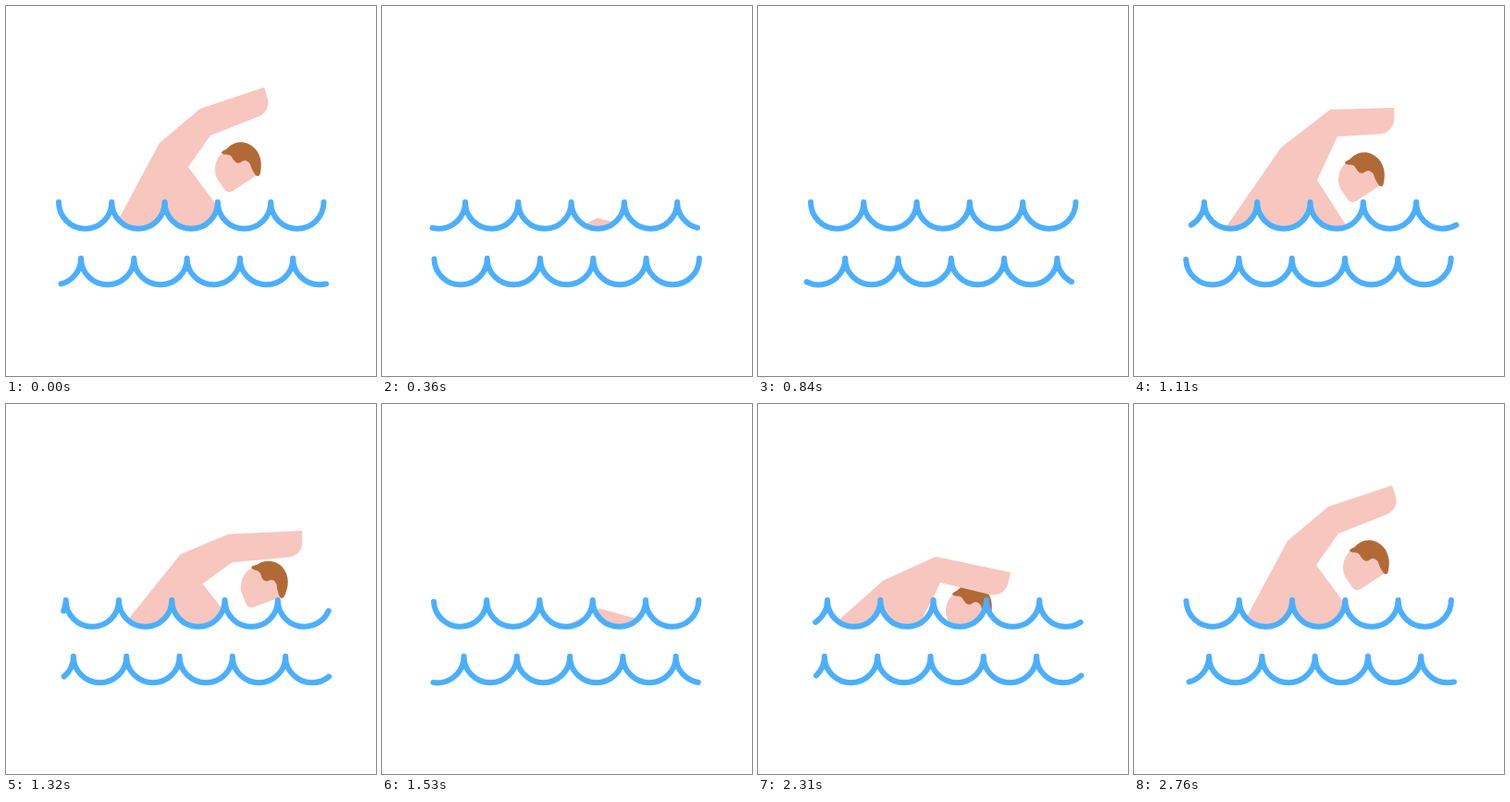
These frames come from a looping animation (400x400 px, 2.79 s). An HTML page with a canvas:

```html
<!DOCTYPE html>
<html lang="en">
<head>
<meta charset="utf-8">
<title>Swimmer</title>
<style>
html, body { margin: 0; height: 100%; overflow: hidden; background: #fff; }
canvas { display: block; width: 400px; height: 400px; }
</style>
</head>
<body>
<canvas id="stage" width="400" height="400"></canvas>
<script>
const ctx = document.getElementById('stage').getContext('2d');
const LOOP = 2790, STEP = 30;
const SKIN = '#f7c6be', HAIR = '#b16a35', WATER = '#4bafff';
const RADIUS = 28.65, LEFT = 57;

// Smooth interpolation that never overshoots its keys
function track(times, values, t) {
  const last = times.length - 1;
  let i = 0;
  while (i < last - 1 && t >= times[i + 1]) i++;
  const slope = k => (values[k + 1] - values[k]) / (times[k + 1] - times[k]);
  const tangent = k => {
    if (k === 0) return slope(0);
    if (k === last) return slope(last - 1);
    const a = slope(k - 1), b = slope(k);
    return a * b > 0 ? 2 * a * b / (a + b) : 0;
  };
  const h = times[i + 1] - times[i], u = Math.min(1, (t - times[i]) / h), v = 1 - u;
  return values[i] * (1 + 2 * u) * v * v + tangent(i) * h * u * v * v +
    values[i + 1] * u * u * (3 - 2 * u) - tangent(i + 1) * h * u * u * v;
}

// Points: hip, shoulder, elbow, fingertip, inner elbow, armpit, belly, head offset; then head turn
const REACH = [107, 258, 166, 148, 210, 111, 279, 88, 221, 140, 197, 174, 250, 246, 0, 0, 0];
const RISE = [87, 257, 159, 153, 212, 112, 281, 110, 220, 141, 198, 188, 240, 254, -5, 11, 0];
const EMERGE = [69, 250, 135, 191, 192, 165, 273, 182, 197, 193, 190, 208, 168, 250, -23, 47, 0];
const SWING = [120, 252, 200, 172, 256, 160, 338, 166, 256, 191, 222, 207, 262, 262, 38, 36, 20];
const DIVE = [163, 258, 235, 221, 290, 236, 366, 258, 282, 266, 255, 255, 262, 290, 50, 110, 40];
const moved = (pose, dx, dy) => pose.map((v, i) => i === 16 ? v : v + (i % 2 ? dy : dx));
const SINK = moved(DIVE, -2, 8);
const GONE = moved(DIVE, 0, 45);
const RETURN = moved(EMERGE, -10, 85);

const KEYS = [
  [-30, REACH], [0, REACH], [170, SWING], [330, DIVE], [360, SINK], [450, GONE],
  [850, RETURN], [990, EMERGE], [1110, RISE], [1200, REACH], [1370, SWING],
  [1530, DIVE], [1570, SINK], [1680, GONE], [2165, RETURN], [2310, EMERGE],
  [2470, RISE], [2760, REACH], [2790, REACH]
];
const KEY_TIMES = KEYS.map(k => k[0]);
const poseAt = t => REACH.map((_, i) => track(KEY_TIMES, KEYS.map(k => k[1][i]), t));

// Crest offsets in wavelengths: the upper row drifts left, the lower one right
const WAVE_TIMES = [0, 360, 840, 1110, 1530, 2310, 2760];
const UPPER = [3, 2.576, 2, 1.33, 0.98, 0.314, -0.01];
const LOWER = [0.42, 0.99, 1.65, 1.985, 2.55, 3.26, 3.42];

// Five half circles, cut by arc length while the crests slide
function wavePath(y, offset) {
  const phase = offset - Math.floor(offset);
  const cut = Math.PI * phase;
  const x = LEFT + 2 * RADIUS * (phase - 1);
  ctx.beginPath();
  for (let k = 0; k < 6; k++) {
    ctx.arc(x + RADIUS * (2 * k + 1), y, RADIUS,
      k === 0 ? cut : Math.PI, k === 5 ? cut : 0, true);
  }
}

function drawWave(y, offset) {
  wavePath(y, offset);
  ctx.stroke();
}

function drawHead(dx, dy, turn) {
  ctx.save();
  ctx.translate(250 + dx, 175 + dy);
  ctx.rotate(turn * Math.PI / 180);
  ctx.translate(-250, -175);
  ctx.fillStyle = SKIN;
  ctx.fill(new Path2D('M234 159C225 166 224 180 229 188L236 198Q239 203 245 200L271 183L262 164Z'));
  ctx.fillStyle = HAIR;
  ctx.fill(new Path2D('M233 159C234 155 237 157 240 153C246 147 255 146 262 149' +
    'C273 154 278 166 275 180Q274 186 270 183C267 179 265 175 264 171' +
    'C260 165 256 167 254 169C249 171 247 168 244 163C241 159 236 162 233 159Z'));
  ctx.restore();
}

function drawBody(p) {
  const [hx, hy, sx, sy, ex, ey, tx, ty, ix, iy, ax, ay, bx, by] = p;
  const angle = Math.atan2(ty - ey, tx - ex), c = Math.cos(angle), s = Math.sin(angle);
  const hand = (along, across) => [tx + along * c - across * s, ty + along * s + across * c];
  ctx.fillStyle = SKIN;
  ctx.beginPath();
  ctx.moveTo(hx, hy);
  ctx.lineTo(sx, sy);
  ctx.lineTo(ex, ey);
  ctx.lineTo(tx, ty);
  ctx.lineTo(...hand(0, 11));
  ctx.bezierCurveTo(...hand(0, 21), ...hand(-7, 28), ...hand(-17, 28));
  ctx.lineTo(ix, iy);
  ctx.lineTo(ax, ay);
  ctx.lineTo(bx, by);
  ctx.fill();
}

function draw(t) {
  const pose = poseAt(t);
  const upper = track(WAVE_TIMES, UPPER, t);
  ctx.clearRect(0, 0, 400, 400);

  // Only what is above the upper row shows
  ctx.save();
  wavePath(212, upper);
  ctx.lineTo(400, 240);
  ctx.lineTo(400, 0);
  ctx.lineTo(0, 0);
  ctx.lineTo(0, 240);
  ctx.clip();
  drawHead(...pose.slice(14));
  drawBody(pose);
  ctx.restore();

  ctx.strokeStyle = WATER;
  ctx.lineWidth = 6;
  ctx.lineCap = ctx.lineJoin = 'round';
  drawWave(212, upper);
  drawWave(272.7, track(WAVE_TIMES, LOWER, t));
}

const start = performance.now();
function tick() {
  const t = (performance.now() - start) % LOOP;
  draw(Math.floor(t / STEP) * STEP);
  requestAnimationFrame(tick);
}
tick();
</script>
</body>
</html>
```
